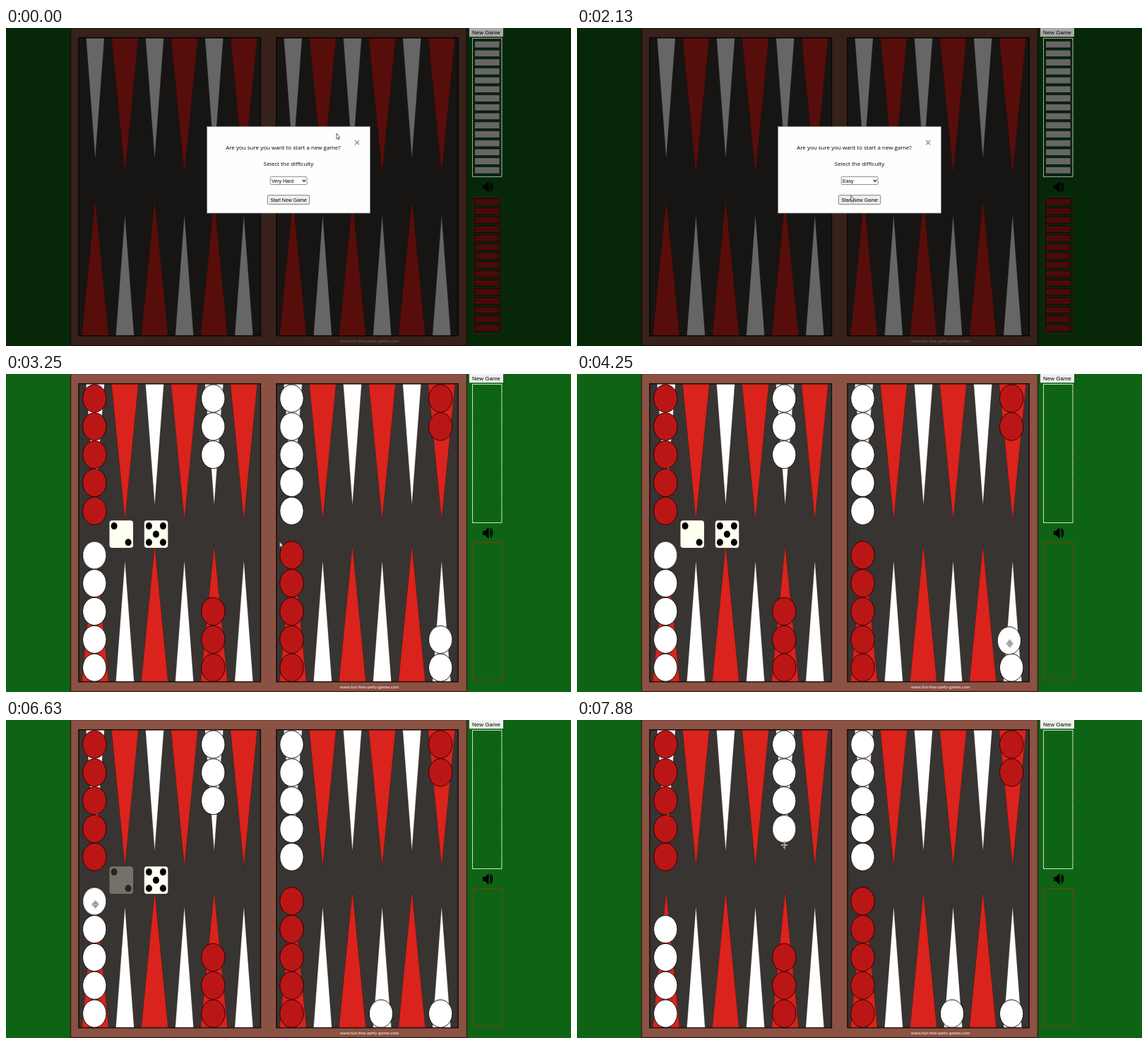
Write an HTML page that moves like this. It is 800 px wide and 450 px high and loops after 8 s.

```html
<!DOCTYPE html>
<html lang="en">
<head>
<meta charset="utf-8">
<title>Backgammon</title>
<style>
html, body { margin: 0; width: 100%; height: 100%; overflow: hidden; background: #0e6414; }
svg { display: block; width: 800px; height: 450px; }
text { font: 7px "Liberation Sans", Arial, sans-serif; fill: #000; }
.mid { text-anchor: middle; }
.prompt { font: 8px "Open Sans", "Noto Sans", sans-serif; }
.site { font: 5.9px Lato, sans-serif; fill: #fff; }
.close { font-weight: bold; font-size: 14px; fill: #999; }
.white { fill: #fff; }
.red { fill: #da231c; }
.checker { stroke: #111; stroke-width: 1; }
.checker.red { fill: #bb1616; stroke: #300; }
.die rect { fill: #fffff0; }

/* hard switches */
.hard { animation: 8s step-end infinite; }
#modal { animation-name: modal; }
#game { animation-name: game; }
#list { animation-name: list; }
#pick { animation-name: pick; }
#before { animation-name: before; }
#after { animation-name: after; }
#start { animation-name: start; }
#dieA { animation-name: dieA; }
#dieB { animation-name: dieB; }
#arrow { animation-name: arrow; }
#grip { animation-name: grip; }
@keyframes modal { 0% { visibility: visible } 40.5%, 100% { visibility: hidden } }
@keyframes game { 0% { visibility: hidden } 40.5%, 100% { visibility: visible } }
@keyframes list { 0% { opacity: 0 } 9.3% { opacity: 1 } 18.7%, 100% { opacity: 0 } }
@keyframes pick {
  0% { transform: translateY(58.8px) }
  10.8% { transform: translateY(0) }
  12.4%, 100% { transform: translateY(14.7px) }
}
@keyframes before { 0% { opacity: 1 } 18.7%, 100% { opacity: 0 } }
@keyframes after { 0% { opacity: 0 } 18.7%, 100% { opacity: 1 } }
@keyframes start {
  0% { fill: #efefef; stroke: #777 }
  9.3% { fill: #f6f6f6; stroke: #c4c4c4 }
  18.7% { fill: #efefef; stroke: #777 }
  28%, 100% { fill: #dedede; stroke: #555 }
}
@keyframes dieA { 0% { opacity: 1 } 60.8% { opacity: .3 } 95.2%, 100% { opacity: 0 } }
@keyframes dieB { 0% { opacity: 1 } 95.2%, 100% { opacity: 0 } }
@keyframes arrow { 0% { opacity: 1 } 49.8% { opacity: 0 } 62.3% { opacity: 1 } 76%, 100% { opacity: 0 } }
@keyframes grip { 0% { opacity: 0 } 49.8% { opacity: 1 } 62.3% { opacity: 0 } 76%, 100% { opacity: 1 } }

/* pointer and dragged checkers */
#pointer { animation: pointer 8s ease-in-out infinite; }
#dragA { animation: dragA 8s ease-in-out infinite; }
#dragB { animation: dragB 8s ease-in-out infinite; }
@keyframes pointer {
  0%, 1.6% { transform: translate(468px, 149px) }
  7.8%, 9.4% { transform: translate(401px, 214px) }
  13.5%, 19% { transform: translate(397px, 246px) }
  28.5%, 39% { transform: translate(387px, 236.5px) }
  40.5%, 43.5% { transform: translate(387.5px, 237px) }
  50.5%, 52% { transform: translate(616px, 380px) }
  60%, 60.9% { transform: translate(533px, 417px) }
  63.8%, 67% { transform: translate(587px, 414px) }
  76.5%, 83.5% { transform: translate(126.5px, 261px); animation-timing-function: ease-in }
  87.5% { transform: translate(156px, 231px); animation-timing-function: ease-out }
  94%, 100% { transform: translate(293.5px, 177px) }
}
@keyframes dragA {
  0%, 52% { transform: translate(615.2px, 375.8px) }
  60%, 60.79% { transform: translate(532.2px, 412.8px) }
  60.8%, 100% { transform: translate(531px, 415.5px) }
}
@keyframes dragB {
  0%, 83.5% { transform: translate(125.3px, 256.5px); animation-timing-function: ease-in }
  87.5% { transform: translate(155px, 226.5px); animation-timing-function: ease-out }
  94%, 95.19% { transform: translate(292.3px, 172.5px) }
  95.2%, 100% { transform: translate(293.3px, 154.2px) }
}
</style>
</head>
<body>
<svg viewBox="0 0 800 450">
  <rect width="800" height="450" fill="#0e6414"/>
  <rect x="91.5" y="-.5" width="561" height="450" fill="#8b5244" stroke="#3a1d16" stroke-width="1.5"/>
  <g fill="#383431" stroke="#1d100c" stroke-width="1.6">
    <rect x="103" y="13.8" width="257.4" height="421.7"/>
    <rect x="383" y="13.8" width="257.2" height="421.7"/>
  </g>
  <g id="points" stroke="#2a1512" stroke-width=".4"></g>
  <text class="site mid" x="514.5" y="445">www.fun-free-party-games.com</text>

  <rect x="656" y="-1" width="48" height="13.3" fill="#efefef"/>
  <text class="mid" x="680" y="8.6" style="font-size:8px">New Game</text>
  <g fill="none" stroke-dasharray="2.4 .6">
    <rect x="660.5" y="14.5" width="41.5" height="196" stroke="#fff"/>
    <rect x="661.5" y="238.5" width="41.5" height="194.5" stroke="#a3300f"/>
  </g>
  <g transform="translate(682.5 225)">
    <path d="M-7.5-3H-4.5L1-8V8L-4.5 3H-7.5Z"/>
    <path d="M2.5-3.5Q5 0 2.5 3.5M3.5-6.5Q9 0 3.5 6.5" fill="none" stroke="#000" stroke-width="1.6"/>
  </g>

  <g id="game" class="hard">
    <g id="stacks"></g>
    <g id="dieA" class="die hard"><rect x="146.5" y="207.3" width="33.5" height="38.6" rx="4"/></g>
    <g id="dieB" class="die hard"><rect x="195.8" y="207.3" width="33.5" height="38.6" rx="4"/></g>
    <ellipse id="dragA" class="checker white" rx="16.7" ry="19.6"/>
    <ellipse id="dragB" class="checker white" rx="16.7" ry="19.6"/>
  </g>

  <g id="modal" class="hard">
    <g id="trays"></g>
    <rect width="800" height="450" opacity=".6"/>
    <rect x="656" y="-1" width="48" height="13.3" fill="#aaa"/>
    <text class="mid" x="680" y="8.6" style="font-size:8px">New Game</text>
    <rect x="660.5" y="14.5" width="41.5" height="196" fill="none" stroke="#bbb" stroke-dasharray="2.4 .6"/>
    <rect x="284.7" y="139.5" width="230.8" height="122.5" fill="#fefefe" stroke="#888" stroke-width=".8"/>
    <text class="close mid" x="497" y="166.8">×</text>
    <text class="prompt mid" x="392.5" y="172.3">Are you sure you want to start a new game?</text>
    <text class="prompt mid" x="400" y="195.2">Select the difficulty</text>
    <rect x="374.2" y="210.5" width="52" height="11" rx="1" fill="#fff" stroke="#777" stroke-width=".8"/>
    <text id="before" class="hard" x="376" y="218.6">Very Hard</text>
    <text id="after" class="hard" x="376" y="218.6">Easy</text>
    <path d="M419.8 214.8L422 217.3L424.2 214.8" fill="none" stroke="#111" stroke-width="1.2"/>
    <rect id="start" class="hard" x="370.3" y="236.6" width="59.4" height="12.8" rx="1" stroke-width=".9"/>
    <text class="mid" x="400" y="245.6">Start New Game</text>
    <g id="list" class="hard">
      <rect x="374.4" y="224" width="51.8" height="74.5" fill="#fff" stroke="#777" stroke-width=".7"/>
      <path d="M374 224H426.5" stroke="#333"/>
      <rect id="pick" class="hard" x="374.8" y="224.5" width="51" height="14.8" fill="#696969"/>
    </g>
  </g>

  <g id="pointer">
    <path id="arrow" class="hard" d="M0 0V8.2L1.6 6.6L2.7 9.2L3.9 8.6L2.8 6.1H4.8Z" fill="#fff" stroke="#222" stroke-width=".7"/>
    <path id="grip" class="hard" d="M0-5.4L2-3H.7V-.8H2.6V-2.2L4.7 0L2.6 2.2V.8H.7V3H2L0 5.4L-2 3H-.7V.8H-2.6V2.2L-4.7 0L-2.6-2.2V-.8H-.7V-3H-2Z" fill="#fff" stroke="#333" stroke-width=".7"/>
  </g>
</svg>
<script>
const $ = id => document.getElementById(id);

function add(parent, tag, attrs) {
  const el = document.createElementNS("http://www.w3.org/2000/svg", tag);
  for (const key in attrs) el.setAttribute(key, attrs[key]);
  return $(parent).appendChild(el);
}

function addPoint(x, base, dir, red) {
  const half = red ? 19 : 13, tip = base + dir * (red ? 194 : 172.5);
  add("points", "path", { class: red ? "red" : "white", d: `M${x - half} ${base}H${x + half}L${x} ${tip}Z` });
}
for (let i = 0; i < 12; i++) {
  const x = (i < 6 ? 126.3 : 153.7) + 42.1 * i;
  addPoint(x, 14.4, 1, i % 2);
  addPoint(x, 435, -1, i % 2 === 0);
}

function addStack(x, base, step, count, color) {
  for (let i = 0; i < count; i++)
    add("stacks", "ellipse", { class: "checker " + color, cx: x, cy: base + step * i, rx: 16.7, ry: 19.6 });
}
const topY = 34.6, bottomY = 415.5, gap = 39.8;
addStack(125.3, topY, gap, 5, "red");
addStack(293.3, topY, gap, 3, "white");
addStack(404.5, topY, gap, 5, "white");
addStack(615.2, topY, gap, 2, "red");
addStack(125.3, bottomY, -gap, 4, "white");
addStack(293.3, bottomY, -gap, 3, "red");
addStack(404.5, bottomY, -gap, 5, "red");
addStack(615.2, bottomY, -gap, 1, "white");

function addPips(die, cx, spots) {
  for (const [x, y] of spots) add(die, "ellipse", { cx: cx + 10 * x, cy: 226.7 + 11.6 * y, rx: 4.5, ry: 5 });
}
addPips("dieA", 163.1, [[-1, -1], [1, 1]]);
addPips("dieB", 212.4, [[-1, -1], [1, -1], [0, 0], [-1, 1], [1, 1]]);

for (let i = 0; i < 15; i++) {
  const bar = { x: 663.5, width: 35.5, height: 9.6, stroke: "#000", "stroke-width": .6 };
  add("trays", "rect", { ...bar, y: 18.4 + 12.72 * i, class: "white" });
  add("trays", "rect", { ...bar, y: 241.6 + 12.72 * i, fill: "#bb1616" });
}

["Very Easy", "Easy", "Medium", "Hard", "Very Hard"].forEach((label, i) => {
  const row = add("list", "text", { x: 377, y: 234.2 + 14.7 * i });
  row.textContent = label;
  if (i === 1) row.style.fill = "#fff";
});
</script>
</body>
</html>
```
